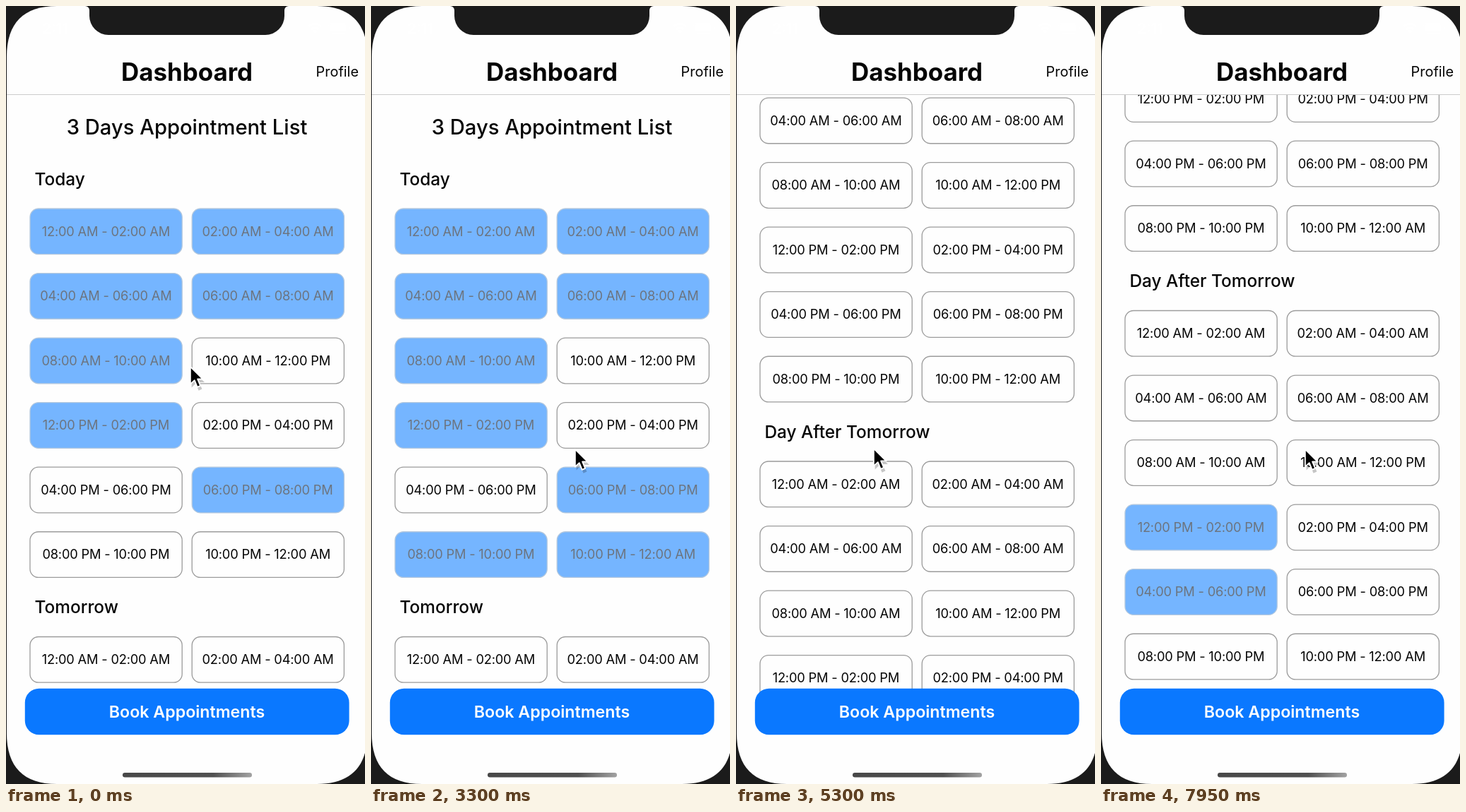
These frames come from a looping animation (508 by 1102 pixels, 8 s). An HTML page:

```html
<!DOCTYPE html>
<html lang="en">
<head>
<meta charset="utf-8">
<title>Appointment dashboard</title>
<style>
  html, body { margin: 0; width: 100%; height: 100%; overflow: hidden; background: #1b1b1b; }
  svg { display: block; width: 100vw; height: 100vh; }
  text { font-family: Inter, Roboto, sans-serif; white-space: pre; fill: #050505; text-anchor: middle; }
  .slot rect { fill: #fefefe; stroke: #9b9b9b; stroke-width: 1.3; }
  .slot text { letter-spacing: -0.2px; }
  .slot.picked rect, .slot.held rect { fill: #0a78ff; stroke: #8a9fb8; }
  .slot.picked text { fill: #e2efff; }
  .slot.booked rect { fill: #75b5ff; stroke: #b3c8de; }
  .slot.booked text { fill: #6c747f; }
  .day { text-anchor: start; }
  .profile { text-anchor: end; }
  .light { fill: #fff; }
  .title { fill: #f0f0f0; }
  .message { fill: #d9d9d9; }
  .ok { fill: #3d87e2; }
</style>
</head>
<body>
<svg id="stage" viewBox="0 0 508 1102" xmlns="http://www.w3.org/2000/svg">
  <defs>
    <clipPath id="listArea"><rect y="126" width="508" height="846"/></clipPath>
    <linearGradient id="bar">
      <stop offset="0" stop-color="#484848"/>
      <stop offset=".7" stop-color="#505050"/>
      <stop offset="1" stop-color="#a2a2a2"/>
    </linearGradient>
    <path id="screen" d="M1 72C1 24 25 0 72 0H440C487 0 511.5 24 511.5 72V1030C511.5 1078 487 1102 440 1102H72C25 1102 1 1078 1 1030Z"/>
  </defs>
  <rect width="508" height="1102" fill="#1b1b1b"/>
  <use href="#screen" fill="#fefefe"/>
  <g clip-path="url(#listArea)"><g id="list"></g></g>
  <g id="header"><path d="M1 125.5H508" stroke="#cbcbcb"/></g>
  <g id="footer">
    <rect x="26.8" y="966.7" width="458.8" height="65.6" rx="20" fill="#0a78ff"/>
    <rect x="165" y="1086" width="183" height="6.5" rx="3.2" fill="url(#bar)"/>
  </g>
  <use id="dim" href="#screen" fill="#000"/>
  <path d="M112 0A6 6 0 0 1 118 6V14A27 27 0 0 0 145 41H367A27 27 0 0 0 394 14V6A6 6 0 0 1 400 0Z" fill="#1b1b1b"/>
  <g id="status" fill="#fff">
    <g fill="none" stroke="#fff" stroke-width="3">
      <path d="M428.3 29.2Q437 20.8 445.7 29.2"/>
      <path d="M431.8 33Q437 28 442.2 33"/>
    </g>
    <path d="M434 35.3Q437 32.6 440 35.3L437 38.8Z"/>
    <rect x="456.3" y="24.3" width="27" height="14" rx="4.4" fill="none" stroke="#fff" stroke-opacity=".5" stroke-width="1.2"/>
    <rect x="458.3" y="26.3" width="23" height="10" rx="2.6"/>
    <path d="M485 29Q488 31.3 485 33.6Z" fill-opacity=".6"/>
    <path d="M400 37H420" stroke="#fff" stroke-opacity=".25" stroke-width="3.6" stroke-linecap="round" stroke-dasharray="0 6.4"/>
  </g>
  <g id="alert">
    <rect x="74.5" y="476" width="364" height="167" rx="19" fill="#3e3e3e"/>
    <path d="M74.5 584H438.5" stroke="#555"/>
  </g>
  <g id="cursor">
    <path d="M1.5 2.5V27L7 21.6L11 31L15.6 29L11.6 20H19Z" opacity=".22" transform="translate(1 2)"/>
    <path d="M.8 .8V24.4L6.4 19.2L10.2 28.4L14.4 26.6L10.6 17.6H17.8Z" stroke="#fff" stroke-width="1.8" stroke-linejoin="round"/>
  </g>
</svg>
<script>
const LOOP = 8000, TICK = 50;
const ROW = 91.55, COLUMN = 229.2, SECTION = 606.5;
const SCROLL_END = 1068.5;
const NS = "http://www.w3.org/2000/svg";
const $ = id => document.getElementById(id);

function add(parent, tag, attrs, content = "") {
  const node = document.createElementNS(NS, tag);
  for (const key in attrs) node.setAttribute(key, attrs[key]);
  node.textContent = content;
  parent.appendChild(node);
  return node;
}

// y is the middle of the capitals
function label(parent, content, x, y, size, weight = 400, name = "") {
  add(parent, "text", { x, y: y + size * 0.363, "font-size": size, "font-weight": weight, class: name }, content);
}

const hour = h => String(h % 12 || 12).padStart(2, "0") + ":00 " + (h % 24 < 12 ? "AM" : "PM");
const dayTop = d => 287 + d * SECTION;
const slotX = i => 34 + (i % 2) * COLUMN;
const slotY = i => dayTop(Math.floor(i / 12)) + Math.floor(i % 12 / 2) * ROW;

const slots = Array.from({ length: 36 }, (_, i) => {
  const g = add($("list"), "g"), x = slotX(i), y = slotY(i), h = i % 12 * 2;
  add(g, "rect", { x, y, width: 215.2, height: 64.7, rx: 12 });
  label(g, hour(h) + " - " + hour(h + 2), x + 107.4, y + 32, 18.3);
  return g;
});
["Today", "Tomorrow", "Day After Tomorrow"].forEach((day, d) =>
  label($("list"), day, 40.5, dayTop(d) - 42, 24.4, 500, "day"));
label($("list"), "3 Days Appointment List", 256, 171, 29.2, 500);
label($("header"), "Dashboard", 256, 93, 34.9, 700);
label($("header"), "Profile", 499, 93, 19.9, 400, "profile");
label($("footer"), "Book Appointments", 256, 1000, 23.2, 600, "light");
label($("status"), "2:11", 69.5, 32, 20.5, 600, "light");
label($("alert"), "Success", 256.5, 516, 22.2, 600, "title");
label($("alert"), "Appointments booked successfully", 256.5, 545, 17.2, 400, "message");
label($("alert"), "OK", 256.5, 614, 22.6, 500, "ok");

const clamp = v => Math.min(1, Math.max(0, v));
const smooth = u => u * u * (3 - 2 * u);

// Each booking: two picks, the button, then OK, always at the same pace
const taken = [0, 1, 2, 3, 4, 6, 9];
const bookings = [
  { open: 2350, picks: [10, 11], scroll: 0, button: [235, 998] },
  { open: 6850, picks: [32, 30], scroll: SCROLL_END, button: [313, 1004] }
];
const pickTime = (open, k) => open - 700 + 400 * k;
const closeTime = open => open + 700;

// One swipe: the finger speeds up, then the list glides to its end
const swipe = { from: 4600, to: 4850, start: [226, 849], end: [194, 626], glide: 1065, decay: 500 };
const pull = u => u ** 2.4;

function scrollAt(t) {
  const dragged = (swipe.start[1] - swipe.end[1]) * pull(clamp((t - swipe.from) / (swipe.to - swipe.from)));
  const glided = swipe.glide * (1 - Math.exp(-Math.max(0, t - swipe.to) / swipe.decay));
  return Math.min(SCROLL_END, dragged + glided);
}

// The pointer arrives a little before each tap
const LEAD = 60, TRAVEL = 300;
const stop = (at, [x, y], ease = smooth) => ({ at, x, y, ease });
const tour = ({ open, picks, scroll, button }) => [
  ...picks.map((i, k) => stop(pickTime(open, k) - LEAD, [slotX(i) + 151, slotY(i) + 6 - scroll])),
  stop(open - LEAD, button),
  stop(closeTime(open) - LEAD, [288, 627])
];
const stops = [
  stop(0, [260, 510]),
  ...tour(bookings[0]),
  stop(swipe.from - 200, swipe.start),
  stop(swipe.to, swipe.end, pull),
  ...tour(bookings[1])
];

function cursorAt(t) {
  const next = stops.findIndex(s => s.at > t);
  if (next < 0) return stops[stops.length - 1];
  const a = stops[next - 1], b = stops[next];
  const travel = b.ease === pull ? swipe.to - swipe.from : Math.min(TRAVEL, 0.7 * (b.at - a.at));
  const u = b.ease(clamp(1 - (b.at - t) / travel));
  return { x: a.x + (b.x - a.x) * u, y: a.y + (b.y - a.y) * u };
}

function slotState(i, t) {
  if (taken.includes(i)) return "booked";
  const booking = bookings.find(b => b.picks.includes(i));
  if (!booking || t < pickTime(booking.open, booking.picks.indexOf(i))) return "free";
  const since = t - booking.open;
  return since < 0 ? "picked" : since < 150 ? "held" : since < 450 ? "free" : "booked";
}

function alertAt(t) {
  const { open } = bookings.findLast(b => b.open <= t) || bookings[0];
  const enter = 1 - (1 - clamp((t - open) / 300)) ** 1.4;
  const leave = clamp((t - closeTime(open)) / 250);
  return { shown: enter * (1 - leave), scale: 1 + 0.17 * (1 - enter) };
}

function render(t) {
  slots.forEach((g, i) => g.setAttribute("class", "slot " + slotState(i, t)));
  $("list").setAttribute("transform", `translate(0 ${-scrollAt(t)})`);

  const { shown, scale } = alertAt(t);
  $("dim").setAttribute("opacity", 0.455 * shown);
  $("alert").setAttribute("opacity", shown);
  $("alert").setAttribute("transform", `translate(256.5 559.5) scale(${scale}) translate(-256.5 -559.5)`);

  const { x, y } = cursorAt(t);
  $("cursor").setAttribute("transform", `translate(${x} ${y}) scale(1.05)`);
}

const start = performance.now();
function frame() {
  const t = (performance.now() - start) % LOOP;
  render(Math.floor(t / TICK) * TICK);
  requestAnimationFrame(frame);
}
render(0);
requestAnimationFrame(frame);
</script>
</body>
</html>
```
